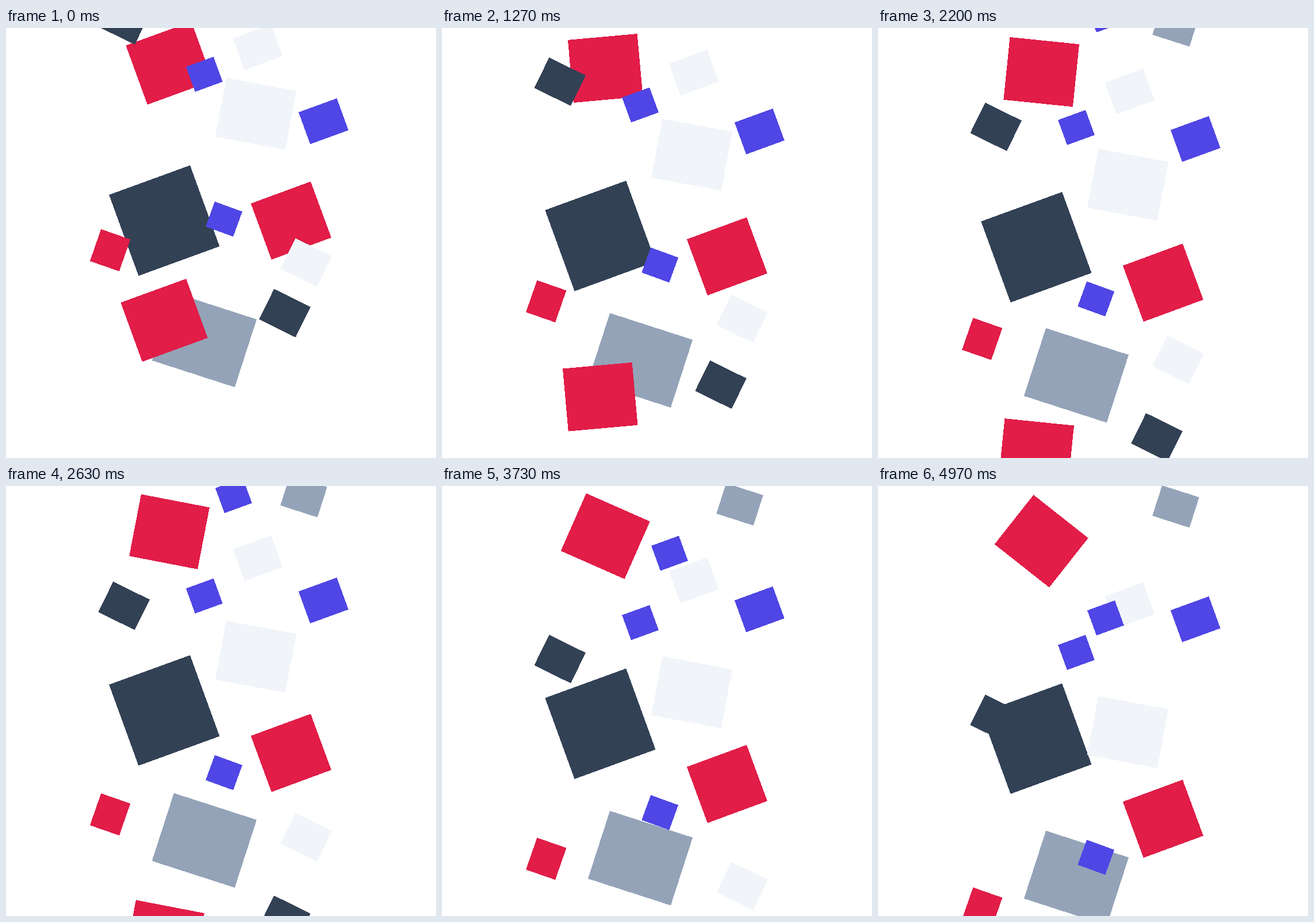
These frames come from a looping animation (748 px wide and 748 px high, 5010 ms). An HTML page:

```html
<!DOCTYPE html>
<html lang="en">
<head>
<meta charset="utf-8">
<title>Drifting tiles</title>
<style>
  html, body { margin: 0; width: 100%; height: 100%; overflow: hidden; background: #fff; }
  svg { display: block; width: 100vw; height: 100vh; }
</style>
</head>
<body>
<svg id="stage" viewBox="0 0 748 748" shape-rendering="crispEdges"></svg>
<script>
const LOOP = 5010;
const LAST_STEP = 149;
const DRIFT = 0.2338; // px per step for the slowest tile
const SPIN = 0.3912;  // degrees per step

const RED = '#e11d48', BLUE = '#4f46e5', DARK = '#334155', GREY = '#94a3b8', LIGHT = '#f1f5f9';

const stage = document.getElementById('stage');

function tile(fill, x, y, w, h, angle, spin = 0) {
  const node = document.createElementNS('http://www.w3.org/2000/svg', 'rect');
  const attrs = { fill, x: -w / 2, y: -h / 2, width: w, height: h };
  for (const key in attrs) node.setAttribute(key, attrs[key]);
  stage.append(node);
  return { node, x, y, angle, spin };
}

function place(node, x, y, angle) {
  node.setAttribute('transform', `translate(${x} ${y}) rotate(${angle})`);
}

// Back to front: each tile falls one unit faster than the one behind it.
const tiles = [
  tile(RED, 284.2, 61.1, 121.2, 109.5, -20, SPIN),
  tile(BLUE, 552.3, 162.2, 70.8, 59, -20),
  tile(DARK, 275.4, 335, 150, 150, -20),
  tile(GREY, 345, 542.6, 151.3, 124, 17.9),
  tile(LIGHT, 438, 33.2, 70.8, 59, -20),
  tile(BLUE, 345, 80.5, 51, 46.3, -20),
  tile(RED, 495.9, 335, 110.9, 104, -20.2),
  tile(LIGHT, 434.5, 149.3, 124, 104.2, 10.6),
  tile(BLUE, 379.2, 332.4, 51, 46.3, 20),
  tile(RED, 181.2, 386.6, 54, 58.8, 19.2),
  tile(LIGHT, 522.3, 407.8, 70.8, 59, 26.2),
  tile(DARK, 205.2, -13.2, 70.8, 59, 26.2),
  tile(BLUE, 396, -223.4, 51, 46.3, -20),
  tile(DARK, 485, 496, 70.8, 59, 26.2),
  tile(RED, 275.2, 508.4, 121.2, 109.5, -20, SPIN),
];
const lateTile = tile(GREY, 518, 35.7, 67.7, 55.5, 17.8);

// Quick entry from above, then a long quadratic settle.
function lateOffset(step) {
  const settle = Math.max(0, 139.3 - step);
  const entry = Math.max(0, 79 - step);
  return 0.00495 * settle ** 2 + 0.08 * entry ** 2;
}

function draw(time) {
  // Thirty steps a second, on a 10 ms clock
  const ticks = Math.floor((time % LOOP) / 10);
  const step = Math.min(LAST_STEP, Math.floor((3 * ticks + 1) / 10));
  tiles.forEach((t, i) =>
    place(t.node, t.x, t.y + (i + 1) * DRIFT * step, t.angle + t.spin * step));
  place(lateTile.node, lateTile.x, lateTile.y - lateOffset(step), lateTile.angle);
}

const start = performance.now();
function tick() {
  draw(performance.now() - start);
  requestAnimationFrame(tick);
}
tick();
</script>
</body>
</html>
```
